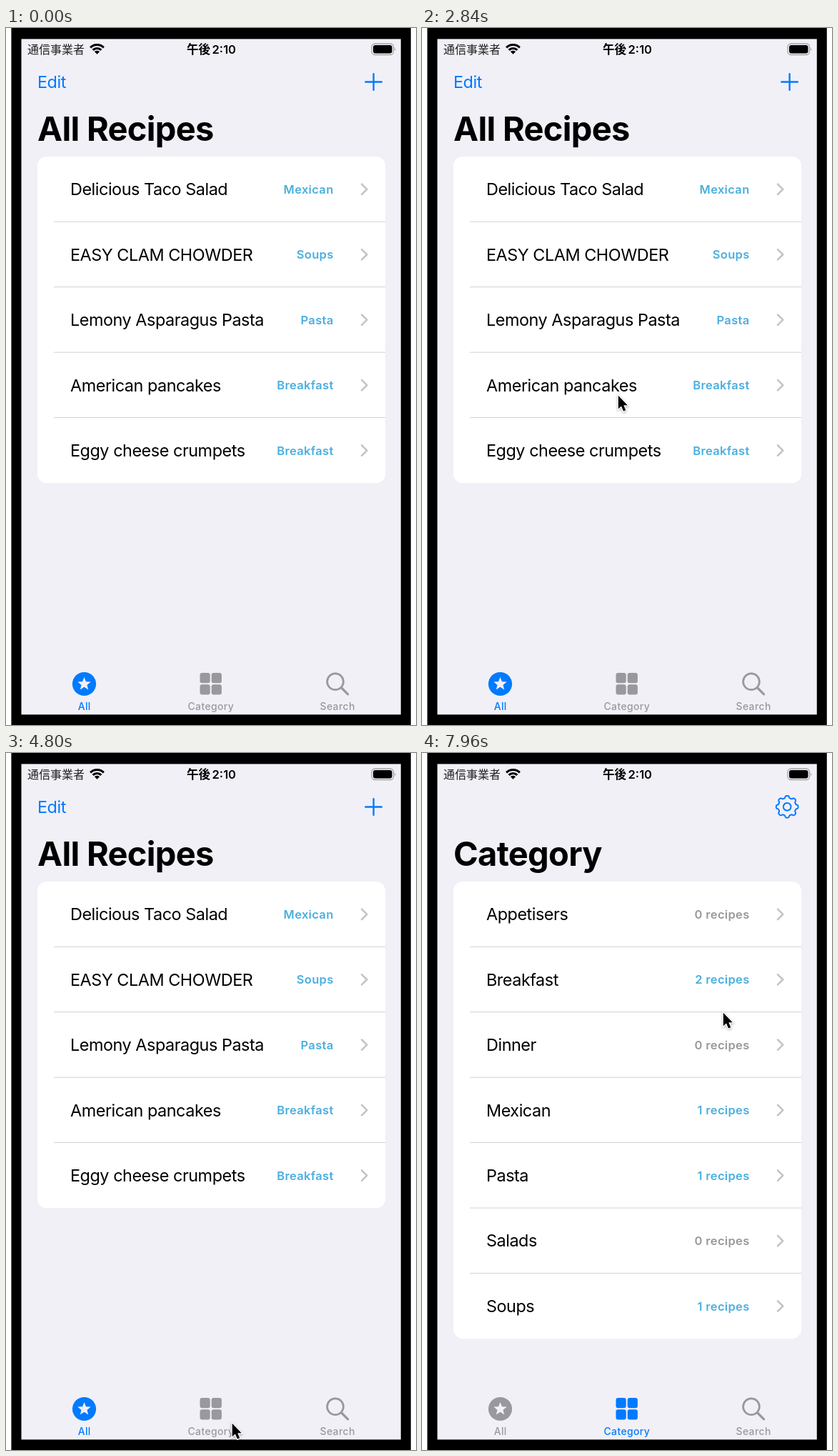
Recreate the animation shown at these times as an HTML page. Size 574 by 976 pixels, loop 8000 ms.

```html
<!DOCTYPE html>
<html lang="ja">
<head>
<meta charset="utf-8">
<title>Recipes</title>
<style>
  html, body { margin: 0; width: 100%; height: 100%; overflow: hidden; background: #fff; }
  svg { display: block; width: 100%; height: 100%; }
  text { font-family: Inter, "Noto Sans CJK JP", "Noto Sans CJK", sans-serif; font-optical-sizing: none; }
  .title { font-size: 47px; font-weight: 700; letter-spacing: -.7px; }
  .body { font-size: 23.4px; letter-spacing: -.46px; }
  .tag { font-size: 16.5px; font-weight: 600; letter-spacing: .33px; text-anchor: end; }
  .tab { font-size: 13.9px; font-weight: 500; letter-spacing: .42px; text-anchor: middle; }
  .carrier { font-size: 16px; font-family: "Noto Sans CJK JP", "Noto Sans CJK", sans-serif; }
  .clock { font-size: 16.5px; font-weight: 600; }
  .line { fill: none; stroke-linecap: round; stroke-linejoin: round; }
</style>
</head>
<body>
<svg id="stage" viewBox="0 0 574 976"></svg>
<script>
const LOOP = 8000, SWITCH_AT = 6320;
const BLUE = '#007aff', SKY = '#4aafdf', GRAY = '#98989d', PAPER = '#f1f0f7';
const stage = document.getElementById('stage');

const text = (cls, x, y, content, fill = '#000') =>
  `<text class="${cls}" x="${x}" y="${y}" fill="${fill}">${content}</text>`;
const rect = (x, y, w, h, r, fill, extra = '') =>
  `<rect x="${x}" y="${y}" width="${w}" height="${h}" rx="${r}" fill="${fill}" ${extra}/>`;
const line = (d, color, width) =>
  `<path class="line" d="${d}" stroke="${color}" stroke-width="${width}"/>`;

// Closed outline around (cx, cy) whose radius is a function of the turn 0..1, starting upwards.
function polar(cx, cy, steps, radius) {
  const points = Array.from({ length: steps }, (_, i) => {
    const a = i / steps * 2 * Math.PI, r = radius(i / steps, i);
    return `${(cx + r * Math.sin(a)).toFixed(2)} ${(cy - r * Math.cos(a)).toFixed(2)}`;
  });
  return `M${points.join('L')}Z`;
}

function statusBar() {
  const cx = 127.5, cy = 36.8;
  const arc = r => {
    const d = r * Math.SQRT1_2;
    return `M${cx - d} ${cy - d}A${r} ${r} 0 0 1 ${cx + d} ${cy - d}`;
  };
  const waves = [8.3, 13.3].map(r =>
    `<path d="${arc(r)}" fill="none" stroke="#000" stroke-width="3"/>`).join('');
  return text('carrier', 30, 36, '通信事業者', '#222') +
    waves + `<path d="${arc(5)}L${cx} ${cy}Z"/>` +
    text('clock', 253, 36, '午後<tspan dx="2.6">2:10</tspan>') +
    rect(512, 22, 30.5, 15.5, 4.5, 'none', 'stroke="#a5a5aa" stroke-width="1.3"') +
    rect(514, 24, 26.5, 11.5, 3, '#000') +
    `<path d="M544 27.3q2.4 2.5 0 5z" fill="#a5a5aa"/>`;
}

function list(rows) {
  const pitch = 91.45;
  return rect(44, 180, 487, rows.length * pitch, 13, '#fff') + rows.map(([name, tag, color = SKY], i) => {
    const y = 225.8 + i * pitch;
    const rule = i ? rect(67, 179.4 + i * pitch, 464, .8, 0, '#c6c6c8') : '';
    return rule + text('body', 90, y + 8.4, name) + text('tag', 458.6, y + 6, tag, color) +
      line(`M498 ${y - 7.2}l7.3 7.2l-7.3 7.2`, '#c3c3c7', 2.5);
  }).join('');
}

function tabBar(active) {
  const tint = i => i === active ? BLUE : GRAY;
  const star = polar(109.5, 918.6, 10, (_, i) => i % 2 ? 4.2 : 9.7);
  const tiles = [[271.5, 903], [287.7, 903], [271.5, 919.2], [287.7, 919.2]]
    .map(([x, y]) => rect(x, y, 14.2, 14.2, 3, tint(1))).join('');
  return `<circle cx="109.5" cy="918.5" r="16.6" fill="${tint(0)}"/><path d="${star}" fill="${PAPER}"/>` +
    tiles +
    `<circle cx="461" cy="915.3" r="11.4" fill="none" stroke="${tint(2)}" stroke-width="2.7"/>` +
    line('M469.7 924L478.6 932.8', tint(2), 3.2) +
    ['All', 'Category', 'Search'].map((name, i) =>
      text('tab', 109.7 + i * 177.2, 955.3, name, tint(i))).join('');
}

function screen(id, title, toolbar, rows, tab) {
  return `<g id="${id}">${toolbar}${text('title', 44, 157.5, title)}${list(rows)}${tabBar(tab)}</g>`;
}

const plus = line('M503.3 75.5h22.6M514.6 64.2v22.6', BLUE, 2.4);
const gearRim = polar(511.2, 75.3, 160, turn => 13.9 + 1.5 * Math.tanh(2 * Math.cos(16 * Math.PI * turn)));
const gear = line(gearRim, BLUE, 2) +
  `<circle cx="511.2" cy="75.3" r="5.3" fill="none" stroke="${BLUE}" stroke-width="2"/>`;

const recipes = [
  ['Delicious Taco Salad', 'Mexican'],
  ['EASY CLAM CHOWDER', 'Soups'],
  ['Lemony Asparagus Pasta', 'Pasta'],
  ['American pancakes', 'Breakfast'],
  ['Eggy cheese crumpets', 'Breakfast'],
];
const categories = Object.entries({
  Appetisers: 0, Breakfast: 2, Dinner: 0, Mexican: 1, Pasta: 1, Salads: 0, Soups: 1,
}).map(([name, n]) => [name, `${n} recipes`, n ? SKY : GRAY]);

stage.innerHTML =
  rect(7.4, 0, 559.4, 976, 0, '#000') + rect(21.5, 15.4, 531.3, 946, 0, PAPER) + statusBar() +
  screen('all', 'All Recipes', text('body', 44, 83.8, 'Edit', BLUE) + plus, recipes, 0) +
  screen('category', 'Category', gear, categories, 1) +
  `<g id="cursor" style="filter:drop-shadow(0 1.5px 1.5px #0005)">
    <path d="M.8 .8V19.3L5 15.4L8 22.6L11.3 21.2L8.3 14.2H13.8Z"
      stroke="#fff" stroke-width="2.6" paint-order="stroke"/></g>`;

// Pointer path: time, x, y
const path = [
  [2200, 335, 985], [2480, 300, 760], [2840, 274, 514], [3000, 300, 540], [3200, 410, 560],
  [3440, 545, 380], [3700, 470, 142], [3920, 421, 199], [4200, 400, 420], [4640, 345, 872],
  [4800, 316, 938], [5080, 300, 920], [5440, 290, 916], [6600, 290, 916],
  [7160, 297, 811], [7840, 416, 378], [7960, 421, 363], [8000, 421, 363],
];

// Monotone cubic through the path points, so the pointer never overshoots.
function along(t, axis) {
  const slope = i => path[i + 1] && path[i]
    ? (path[i + 1][axis] - path[i][axis]) / (path[i + 1][0] - path[i][0]) : 0;
  const tangent = i => {
    const a = slope(i - 1), b = slope(i);
    return a * b > 0 ? 2 * a * b / (a + b) : 0;
  };
  const i = Math.max(0, path.findIndex(p => p[0] > t) - 1);
  const span = path[i + 1][0] - path[i][0], u = (t - path[i][0]) / span;
  const ease = u * u * (3 - 2 * u);
  return path[i][axis] * (1 - ease) + path[i + 1][axis] * ease +
    span * u * (1 - u) * (tangent(i) * (1 - u) - tangent(i + 1) * u);
}

const [all, category, cursor] = ['all', 'category', 'cursor'].map(id => document.getElementById(id));
const show = (node, on) => node.setAttribute('visibility', on ? 'visible' : 'hidden');

function draw() {
  const t = performance.now() % LOOP;
  show(all, t < SWITCH_AT);
  show(category, t >= SWITCH_AT);
  show(cursor, t >= path[0][0]);
  if (t >= path[0][0]) cursor.setAttribute('transform', `translate(${along(t, 1)} ${along(t, 2)})`);
  requestAnimationFrame(draw);
}
draw();
</script>
</body>
</html>
```
